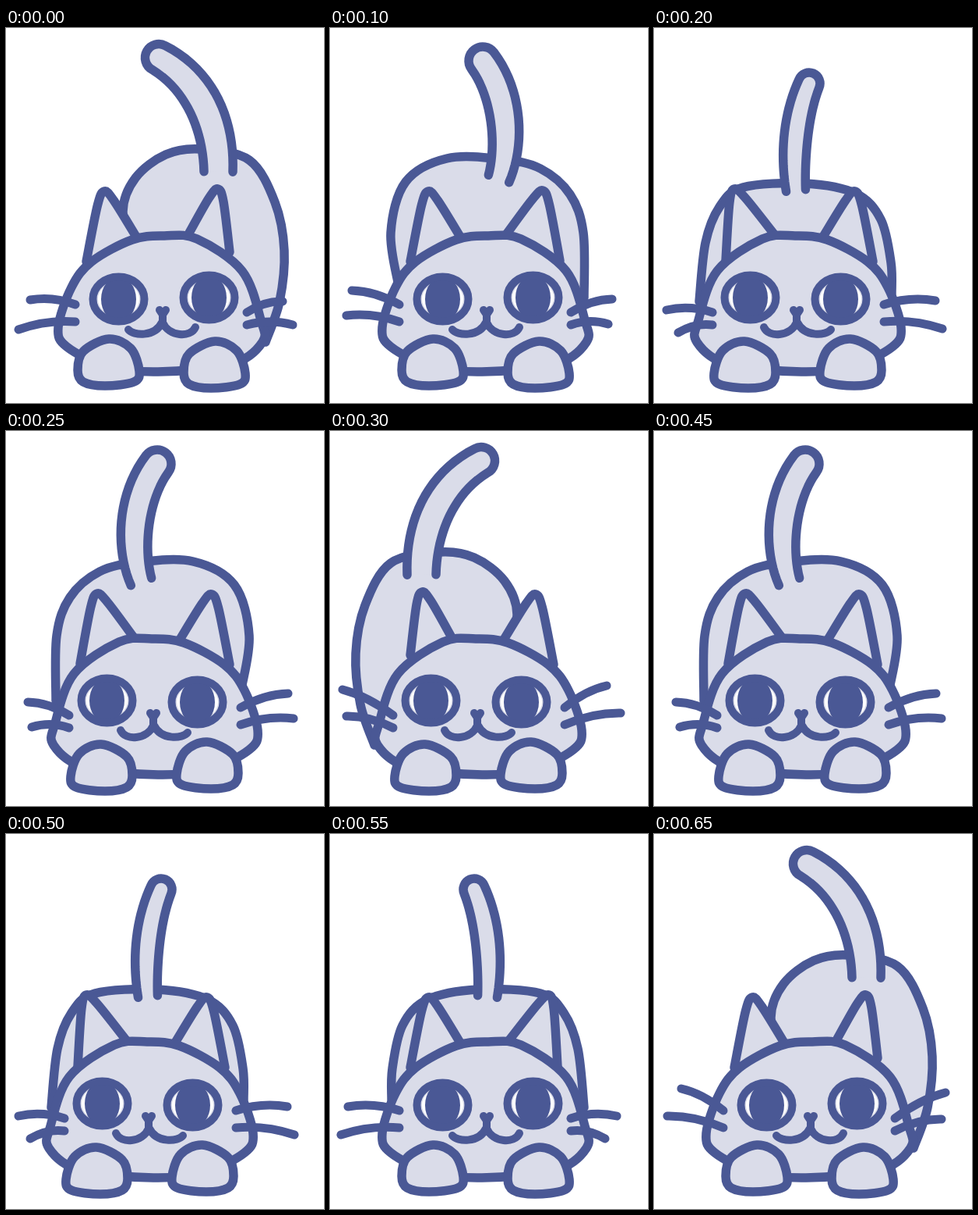
An HTML page with a canvas that plays this animation: 408 by 480 pixels, repeating every 0.7 s.

```html
<!DOCTYPE html>
<html lang="en">
<head>
<meta charset="utf-8">
<title>Wiggling cat</title>
<style>
  html, body { margin: 0; width: 100%; height: 100%; overflow: hidden; background: #fff; }
  canvas { display: block; }
</style>
</head>
<body>
<canvas id="stage" width="408" height="480"></canvas>
<script>
const INK = '#4a5895', FUR = '#dadce9', STEP = 50;
const ctx = document.getElementById('stage').getContext('2d');
ctx.lineCap = ctx.lineJoin = 'round';

const mix = (a, b, t) => a + (b - a) * t;
const parse = text => text.split(' ').map(s => s.split(',').map(Number));

// Smooth curve through a few points.
function curve(p, closed = false) {
  const n = p.length, path = new Path2D();
  const at = i => closed ? p[(i + n) % n] : p[Math.max(0, Math.min(n - 1, i))];
  path.moveTo(...p[0]);
  for (let i = 0; i < (closed ? n : n - 1); i++) {
    const [a, b, c, d] = [at(i - 1), at(i), at(i + 1), at(i + 2)];
    path.bezierCurveTo(
      b[0] + (c[0] - a[0]) / 6, b[1] + (c[1] - a[1]) / 6,
      c[0] - (d[0] - b[0]) / 6, c[1] - (d[1] - b[1]) / 6, c[0], c[1]);
  }
  if (closed) path.closePath();
  return path;
}

// Tail outline: a Bézier spine with a half width at base and tip.
function tailShape([p0, p1, p2, p3], base, tip) {
  const n = 20, path = new Path2D(), far = [];
  for (let i = 0; i <= n; i++) {
    const t = i / n, u = 1 - t;
    const [x, y] = [0, 1].map(k =>
      u * u * u * p0[k] + 3 * u * u * t * p1[k] + 3 * u * t * t * p2[k] + t * t * t * p3[k]);
    const [dx, dy] = [0, 1].map(k =>
      u * u * (p1[k] - p0[k]) + 2 * u * t * (p2[k] - p1[k]) + t * t * (p3[k] - p2[k]));
    const w = mix(base, tip, t) + 2 * Math.sin(Math.PI * t), len = Math.hypot(dx, dy);
    const nx = dy / len * w, ny = -dx / len * w;
    path.lineTo(x + nx, y + ny);
    far.unshift([x - nx, y - ny]);
    if (i === n) {
      const h = Math.atan2(dy, dx);
      path.arc(x, y, tip, h - Math.PI / 2, h + Math.PI / 2);
    }
  }
  far.forEach(q => path.lineTo(...q));
  return path;
}

// Ear from base to tip to base, its sides bulging slightly.
function ear(a, tip, b) {
  const side = (end, bulge) => [mix(tip[0], end[0], 0.2) + bulge, mix(tip[1], end[1], 0.2)];
  return curve([a, side(a, -4), tip, side(b, 4), b]);
}

const head = curve(parse('203,266 162,271 110,299 84,332 67,383 78,408 130,433 195,440 290,430 329,402 327,374 303,311 245,270'), true);
const leftEar = ear([103, 299], [126, 209], [167, 267]);
const paw = curve(parse('-40,10 -33,-14 0,-30 28,-18 39,11 32,25 -5,30 -33,25'), true);
const paws = [[132, 428], [268, 431]];
const eyes = [[144.5, 347], [260.5, 345]];
const mouth = new Path2D('M-4-2L0 4L4-2M0 4V14M-44 23C-38 31-10 33-1 14M0 14C8 32 36 34 42 20');
const roots = [[89, 354], [89, 376], [309, 364], [309, 380]];

// Whiskers bow upwards between root and tip.
const whiskers = text => parse(text).map(([x, y], i) => {
  const [rx, ry] = roots[i], path = new Path2D();
  path.moveTo(rx, ry);
  path.quadraticCurveTo((rx + x) / 2, (ry + y) / 2 - 8, x, y);
  return path;
});

const rump = {
  side: [
    curve(parse('165,300 150,235 166,192 205,162 250,155 312,169 345,223 357,285 351,350 333,402')),
    tailShape(parse('272.5,184 273,125 250,68 196,38'), 18.5, 17.5),
    ear([234, 264], [272, 206], [287, 287])
  ],
  middle: [
    curve(parse('88,330 78,262 97,197 150,167 220,168 270,180 308,213 325,262 326,345')),
    tailShape(parse('216.5,193 232,150 228,85 196,42'), 14, 18),
    ear([224, 267], [273, 208], [295, 298])
  ],
  low: [
    curve(parse('79,340 80,300 93,245 125,212 190,199 270,204 300,229 318,275 326,350')),
    tailShape(parse('202,208 206,170 204,115 185,71'), 12.5, 14),
    ear([229, 265], [281, 206], [292, 298])
  ]
};

// Half a swing; the other half is its mirror image, where x becomes mirror - x.
const swing = [
  { back: rump.side,   mirror: 397, whiskers: whiskers('31,348 16,386 355,350 368,380') },
  { back: rump.side,   mirror: 390, whiskers: whiskers('35,326 17,361 374,331 369,365') },
  { back: rump.middle, mirror: 390, whiskers: whiskers('28,336 21,368 362,347 357,379') },
  { back: rump.low,    mirror: 384, whiskers: whiskers('23,349 14,385 368,361 353,390') }
];

function line(path, width) {
  ctx.lineWidth = width;
  ctx.stroke(path);
}

function furry(path) {
  ctx.fillStyle = FUR;
  ctx.fill(path);
  line(path, 11.5);
}

function placed([x, y], paint) {
  ctx.save();
  ctx.translate(x, y);
  paint();
  ctx.restore();
}

function oval(rx, ry, color) {
  const path = new Path2D();
  path.ellipse(0, 0, rx, ry, 0, 0, 2 * Math.PI);
  ctx.fillStyle = color;
  ctx.fill(path);
  return path;
}

function eye() {
  const rim = oval(33, 28.5, FUR);
  oval(26.5, 22, '#fff');
  oval(22.5, 28.5, INK);
  line(rim, 10);
}

function draw(index) {
  const flipped = index > 3, pose = swing[flipped ? 7 - index : index];
  ctx.setTransform(1, 0, 0, 1, 0, 0);
  ctx.fillStyle = '#fff';
  ctx.fillRect(0, 0, 408, 480);
  if (flipped) ctx.setTransform(-1, 0, 0, 1, pose.mirror, 0);
  ctx.strokeStyle = INK;
  [...pose.back, leftEar, head].forEach(furry);
  paws.forEach(p => placed(p, () => furry(paw)));
  pose.whiskers.forEach(w => line(w, 11));
  eyes.forEach(e => placed(e, eye));
  placed([201, 363], () => line(mouth, 10));
}

// Eight drawings played forwards and back.
function tick() {
  const i = Math.floor(performance.now() / STEP) % 14;
  draw(Math.min(i, 14 - i));
  requestAnimationFrame(tick);
}
tick();
</script>
</body>
</html>
```
